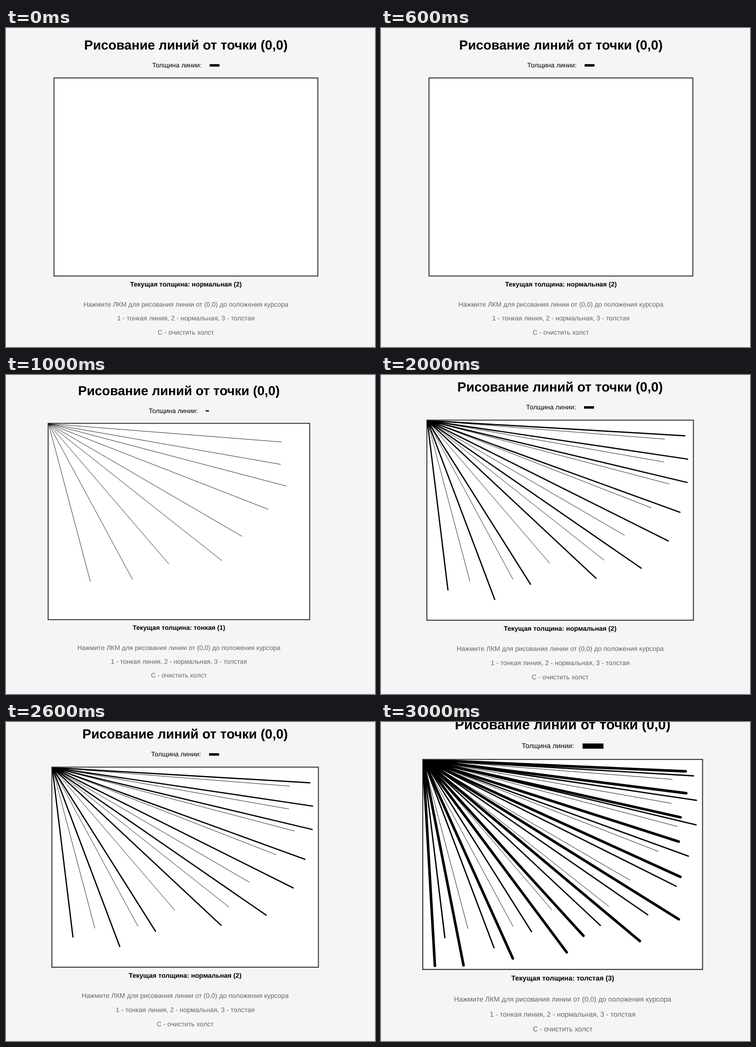
These frames come from a looping animation (805 by 696 pixels, 4 s). An HTML page:

```html
<!DOCTYPE html>
<html lang="ru">
<head>
<meta charset="utf-8">
<title>Рисование линий</title>
<style>
  html, body { margin: 0; width: 100%; height: 100%; overflow: hidden; background: #f5f5f5; }
  svg { display: block; width: 805px; height: 696px; }
  text { font-family: "Liberation Sans", Arial, sans-serif; font-size: 16px; text-rendering: geometricPrecision; }
  .mid { text-anchor: middle; }
  .bold { font-weight: bold; }
  .title { font-size: 32px; }
  .hint { fill: #666; }
</style>
</head>
<body>
<svg viewBox="0 0 805 696">
  <defs><clipPath id="inside"><rect width="640" height="480"/></clipPath></defs>
  <rect width="805" height="696" fill="#f5f5f5"/>
  <!-- Page origin: top centre of the bordered board -->
  <g id="page">
    <text class="mid bold title" y="-68">Рисование линий от точки (0,0)</text>
    <text id="label" y="-24.4">Толщина линии:</text>
    <rect id="swatch"/>
    <rect x="-320.9" y="1.1" width="641.8" height="481.8" fill="#fff" stroke="#333" stroke-width="2.3"/>
    <g id="board" transform="translate(-320 2)" clip-path="url(#inside)" stroke="#000" stroke-linecap="round" fill="none"></g>
    <text id="status" class="mid bold" y="508.2"></text>
    <text class="mid hint" y="557.1">Нажмите ЛКМ для рисования линии от (0,0) до положения курсора</text>
    <text class="mid hint" y="591.2">1 - тонкая линия, 2 - нормальная, 3 - толстая</text>
    <text class="mid hint" y="625.3">C - очистить холст</text>
  </g>
</svg>
<script>
const $ = id => document.getElementById(id);

const pens = [
  { name: "тонкая (1)", width: 1, swatch: [8, 3], ends: [
    [571.6, 44.8], [569.4, 99.8], [582.9, 152.8], [539, 210], [474.9, 276.4],
    [425.4, 336], [295, 343.9], [206.1, 382.1], [102.6, 387]] },
  { name: "нормальная (2)", width: 3, swatch: [24, 6], ends: [
    [620.2, 36.8], [627, 92.9], [626, 149.2], [608.4, 221], [580.2, 290],
    [515.1, 355.6], [406.4, 379.9], [248.6, 394.3], [162.5, 431], [49.8, 408]] },
  { name: "толстая (3)", width: 6, swatch: [48, 12], ends: [
    [602.1, 26.4], [603.5, 76.7], [590.5, 131.9], [586.3, 187.6], [590, 268.6], [586.3, 365.8],
    [497, 415.8], [367.6, 403.7], [329.2, 441.5], [205.7, 455.7], [92.6, 471.5], [26.9, 472.6]] }
];

// Each scene: view position and zoom, current pen, number of line sets drawn
const scenes = [
  { x: 392.5, y: 108, zoom: 0.897, pen: 1, sets: 0 },
  { x: 377.2, y: 104.5, zoom: 0.889, pen: 0, sets: 1 },
  { x: 390.8, y: 97.5, zoom: 0.906, pen: 1, sets: 2 },
  { x: 396.3, y: 80.6, zoom: 0.951, pen: 2, sets: 3 }
];
const HOLD = 1000;

const sets = pens.map(({ width, ends }) => {
  const path = document.createElementNS("http://www.w3.org/2000/svg", "path");
  path.setAttribute("d", ends.map(([x, y]) => `M0 0L${x} ${y}`).join(""));
  path.setAttribute("stroke-width", width);
  $("board").append(path);
  return path;
});

function setAttrs(el, attrs) {
  for (const key in attrs) el.setAttribute(key, attrs[key]);
}

function show({ x, y, zoom, pen, sets: count }) {
  const [w, h] = pens[pen].swatch;
  const left = -(139.3 + w) / 2;
  setAttrs($("page"), { transform: `translate(${x} ${y}) scale(${zoom})` });
  setAttrs($("label"), { x: left - 0.3 });
  setAttrs($("swatch"), { x: left + 139.3, y: -29.5 - h / 2, width: w, height: h });
  $("status").textContent = "Текущая толщина: " + pens[pen].name;
  sets.forEach((path, i) => path.style.display = i < count ? "" : "none");
}

let start = null, current = -1;
function tick(now) {
  start ??= now;
  const index = Math.floor((now - start) / HOLD) % scenes.length;
  if (index !== current) show(scenes[current = index]);
  requestAnimationFrame(tick);
}
show(scenes[0]);
requestAnimationFrame(tick);
</script>
</body>
</html>
```
